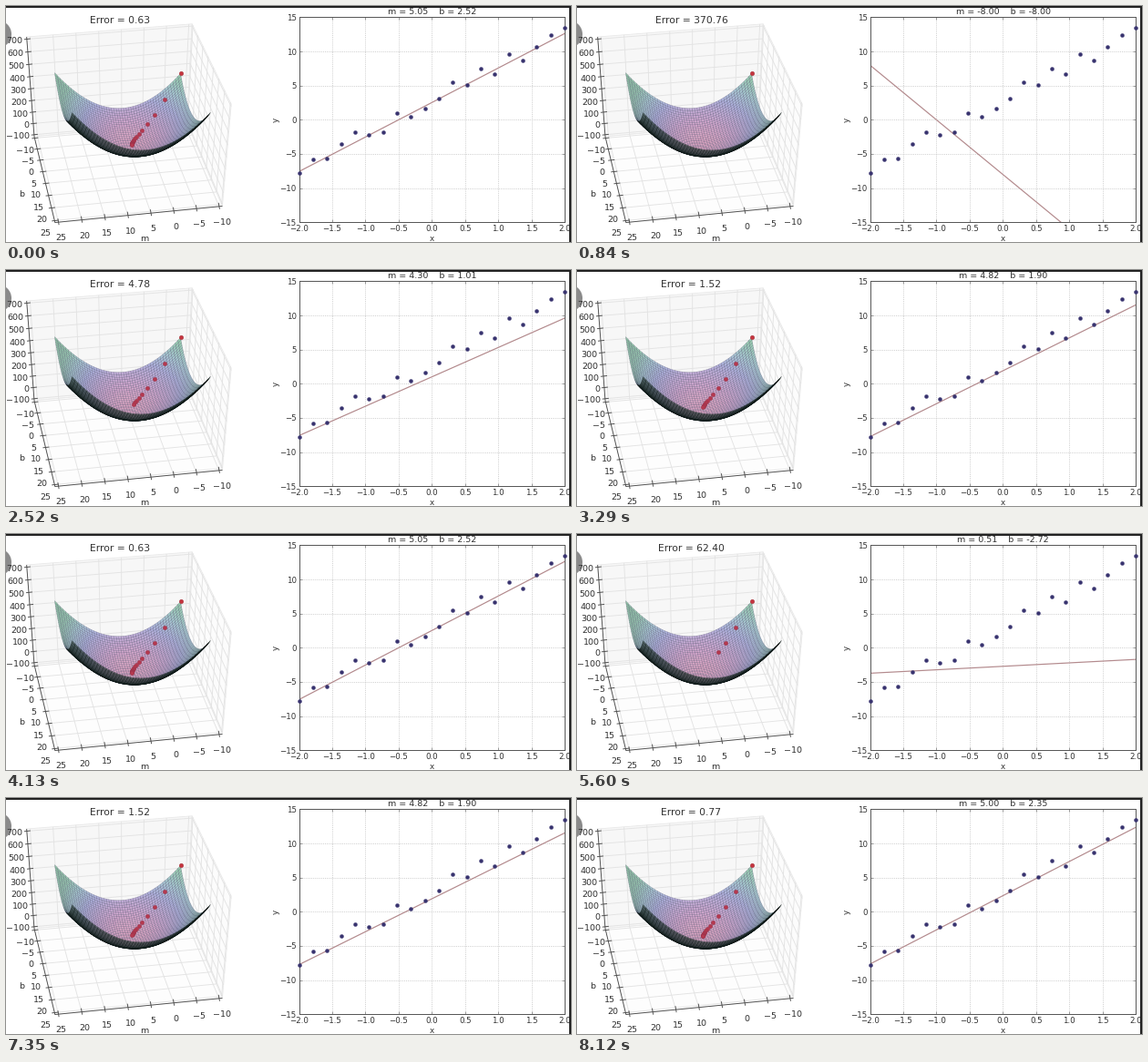
Animation of 620 by 260 pixels, one loop 8190 ms. Source, as a matplotlib script:

```python
import numpy as np
import matplotlib.pyplot as plt
from matplotlib.animation import FuncAnimation
from matplotlib.collections import LineCollection, PolyCollection
from matplotlib.colors import LinearSegmentedColormap
from matplotlib.patches import Circle, Polygon, Rectangle

W, H, DPI = 620, 260, 100
FRAMES, STEPS = 117, 20
PX = 72 / DPI
INK = "#303030"

plt.rcParams["font.family"] = "DejaVu Sans"

# Least-squares fit: optimum, residual and start of the descent
M, B, FLOOR = 5.102, 2.828, 0.5335
START, RATE = -8.0, 0.1
XS = np.linspace(-2, 2, 20)
YS = [-7.8, -5.85, -5.72, -3.52, -1.8, -2.26, -1.8, 0.93, 0.47, 1.66,
      3.06, 5.45, 5.12, 7.5, 6.7, 9.57, 8.7, 10.7, 12.4, 13.5]
SPREAD = np.mean(XS ** 2)


def error(m, b):
    return FLOOR + SPREAD * (m - M) ** 2 + (b - B) ** 2


K = np.arange(STEPS)
PATH_M = M + (START - M) * (1 - 2 * RATE * SPREAD) ** K
PATH_B = B + (START - B) * (1 - 2 * RATE) ** K
PATH_E = error(PATH_M, PATH_B)

# Perspective camera, in pixels
AZ, EL = np.radians(80), np.radians(40)
DIST, CENTER, SCALE = 8, (130.2, 127.4), (178, 139)
RIGHT = np.array([-np.sin(AZ), np.cos(AZ), 0])
UP = np.array([-np.sin(EL) * np.cos(AZ), -np.sin(EL) * np.sin(AZ), np.cos(EL)])
EYE = np.array([np.cos(EL) * np.cos(AZ), np.cos(EL) * np.sin(AZ), np.sin(EL)])


def project(m, b, z):
    m, b, z = np.broadcast_arrays(m, b, z)
    p = np.stack([(m + 10) / 35, (b + 10) / 35, (z + 100) / 800], -1) - 0.5
    f = DIST / (DIST - p @ EYE)
    x = CENTER[0] + SCALE[0] * (p @ RIGHT) * f
    y = CENTER[1] - SCALE[1] * (p @ UP) * f
    return np.stack([x, y], -1), p @ EYE


def pt(m, b, z):
    return project(m, b, z)[0]


fig = plt.figure(figsize=(W / DPI, H / DPI), dpi=DPI, facecolor="white")
stage = fig.add_axes([0, 0, 1, 1])
stage.set(xlim=(0, W), ylim=(H, 0))
stage.axis("off")


def label(x, y, s, size, ha="center", **kw):
    """Text whose digits are centred on y."""
    return stage.text(x, y + 0.365 * size, s, fontsize=size * PX, ha=ha,
                      va="baseline", color=INK, **kw)


def number(v, fmt="{:g}"):
    return fmt.format(v).replace("-", "\u2212")


def segments(lines, color, width, z):
    stage.add_collection(LineCollection(lines, colors=color,
                                        linewidths=width * PX, zorder=z))


# Panes, grid and axes of the 3D box
PAD = 35 / 48
LO, HI = -10 - PAD, 25 + PAD
ZLO, ZHI = -100 - 800 / 48, 700 + 800 / 48
TICKS, ZTICKS = np.arange(-10, 26, 5), np.arange(-100, 701, 100)


def pane(corners, color):
    stage.add_patch(Polygon([pt(*c) for c in corners], fc=color, ec="#e8e8e8",
                            lw=0.8 * PX, zorder=1))


pane([(LO, LO, ZLO), (HI, LO, ZLO), (HI, LO, ZHI), (LO, LO, ZHI)], "#f7f7f7")
pane([(LO, LO, ZLO), (LO, HI, ZLO), (LO, HI, ZHI), (LO, LO, ZHI)], "#fcfcfc")
pane([(LO, LO, ZLO), (HI, LO, ZLO), (HI, HI, ZLO), (LO, HI, ZLO)], "#fdfdfd")

grid = []
for t in TICKS:
    grid.append([pt(t, HI, ZLO), pt(t, LO, ZLO), pt(t, LO, ZHI)])
    grid.append([pt(HI, t, ZLO), pt(LO, t, ZLO), pt(LO, t, ZHI)])
for t in ZTICKS:
    grid.append([pt(HI, LO, t), pt(LO, LO, t), pt(LO, HI, t)])
segments(grid, "#e3e3e3", 0.9, 2)

axes_lines = [[pt(HI, LO, ZHI), pt(HI, LO, ZLO), pt(HI, HI, ZLO), pt(LO, HI, ZLO)]]
for t in TICKS:
    x, y = pt(t, HI, ZLO)
    axes_lines.append([(x - 0.6, y - 4), (x + 0.6, y + 3)])
    label(x + 2.8, y + 16.7, number(t), 9.5)
    x, y = pt(HI, t, ZLO)
    axes_lines.append([(x - 3, y + 0.4), (x + 4, y - 0.4)])
    label(x - 10.2, y + 12.6, number(t), 9.5)
for t in ZTICKS:
    x, y = pt(HI, LO, t)
    axes_lines.append([(x - 3, y + 0.4), (x + 4, y - 0.4)])
    label(x - 4.4, y + 1.2, number(t), 9.5, ha="right", zorder=9)
segments(axes_lines, "#4a4a4a", 0.9, 3)
label(17, 207, "b", 9.5)
label(152, 256, "m", 9.5)

# Error surface, painted back to front
N = 50
side = np.linspace(-8, 20.4, N + 1)
gm, gb = np.meshgrid(side, side)
gz = error(gm, gb)
xy, depth = project(gm, gb, gz)


def cells(a):
    return np.stack([a[:-1, :-1], a[:-1, 1:], a[1:, 1:], a[1:, :-1]], 2)


quads = cells(xy).reshape(-1, 4, 2)
heights = cells(gz).mean(2).ravel()
order = np.argsort(cells(depth).mean(2).ravel())
d1, d2 = quads[:, 2] - quads[:, 0], quads[:, 3] - quads[:, 1]
turn = d1[:, 0] * d2[:, 1] - d1[:, 1] * d2[:, 0]
inside = turn * np.sign(turn[np.argmin(heights)]) > 0

cmap = LinearSegmentedColormap.from_list("bowl", [
    (0, "#e2a9c6"), (0.12, "#cfa8d0"), (0.3, "#b0b2de"),
    (0.45, "#a8cad2"), (0.6, "#9bcfb3"), (1, "#88c09a")])
faces = cmap(heights / 560)
faces[~inside] = (0.27, 0.36, 0.33, 0.5)
edges = np.where(inside[:, None], (0.16, 0.16, 0.3, 0.34), (0.04, 0.08, 0.07, 0.55))
stage.add_collection(PolyCollection(quads[order], facecolors=faces[order],
                                    edgecolors=edges[order],
                                    linewidths=0.5 * PX, zorder=4))

trail_xy = pt(PATH_M, PATH_B, PATH_E)
trail, = stage.plot([], [], "o", ms=4.3 * PX, mfc="#b5394f", mec="#95304a",
                    mew=0.4 * PX, zorder=6)
stage.plot(*trail_xy[0], "o", ms=4.5 * PX, mfc="#c5353f", mec="#9c2f38",
           mew=0.4 * PX, zorder=7)
error_title = label(125.5, 15.3, "", 10.7)

# Screen edges and the round button
stage.add_patch(Circle((-9, 31), 15, fc="#8a8a8a", ec="none", zorder=8))
stage.add_patch(Rectangle((0, 0), W, 1.5, fc="#222222", ec="none", zorder=8))
stage.add_patch(Rectangle((618.3, 0), 2, H, fc="#222222", ec="none", zorder=8))

# Line fit panel
L, R, T, BOT = 321.5, 613, 12.5, 238.2
ax = fig.add_axes([L / W, 1 - BOT / H, (R - L) / W, (BOT - T) / H])
ax.set(xlim=(-2, 2), ylim=(-15, 15),
       xticks=np.arange(-2, 2.1, 0.5), yticks=np.arange(-15, 16, 5))
ax.tick_params(direction="in", top=True, right=True, length=3 * PX,
               width=0.6 * PX, color="#666666", labelbottom=False,
               labelleft=False)
ax.grid(ls=":", color="#b8b8b8", lw=0.8 * PX)
ax.set_axisbelow(True)
for s in ax.spines.values():
    s.set(linewidth=1 * PX, color="#585858")
for v in np.arange(-2, 2.1, 0.5):
    label(L + (v + 2) / 4 * (R - L), 245.3, number(v, "{:.1f}"), 8.7)
for v in range(-15, 16, 5):
    label(318.8, BOT - (v + 15) / 30 * (BOT - T) + 0.3, number(v), 8.7, ha="right")
label(467, 256, "x", 8.8)
stage.text(296.5, 125.5, "y", fontsize=8.8 * PX, rotation=90, ha="center",
           va="center", color=INK)
line, = ax.plot([], [], color="#b38a8d", lw=1.2 * PX, zorder=2)
ax.plot(XS, YS, "o", ms=4 * PX, mfc="#38336f", mec="#38336f", mew=0.4 * PX,
        clip_on=False, zorder=3)
fit_title = label(467.5, 5.8, "", 9.5, zorder=9)

# The descent advances about every third frame, with slight timing drift
DRIFT = ([0, 47, 59, 95, 116], [0.3, 15.8, 20.05, 32.1, 38.8])


def update(i):
    k = (16 + int(np.interp(i, *DRIFT))) % STEPS
    m, b = PATH_M[k], PATH_B[k]
    trail.set_data(trail_xy[1:k + 1, 0], trail_xy[1:k + 1, 1])
    line.set_data([-2, 2], [b - 2 * m, b + 2 * m])
    error_title.set_text(f"Error = {PATH_E[k]:.2f}")
    fit_title.set_text(f"m = {m:.2f}    b = {b:.2f}")
    return trail, line, error_title, fit_title


anim = FuncAnimation(fig, update, frames=FRAMES, interval=70, repeat=True,
                     repeat_delay=0, blit=False)
plt.show()
```
